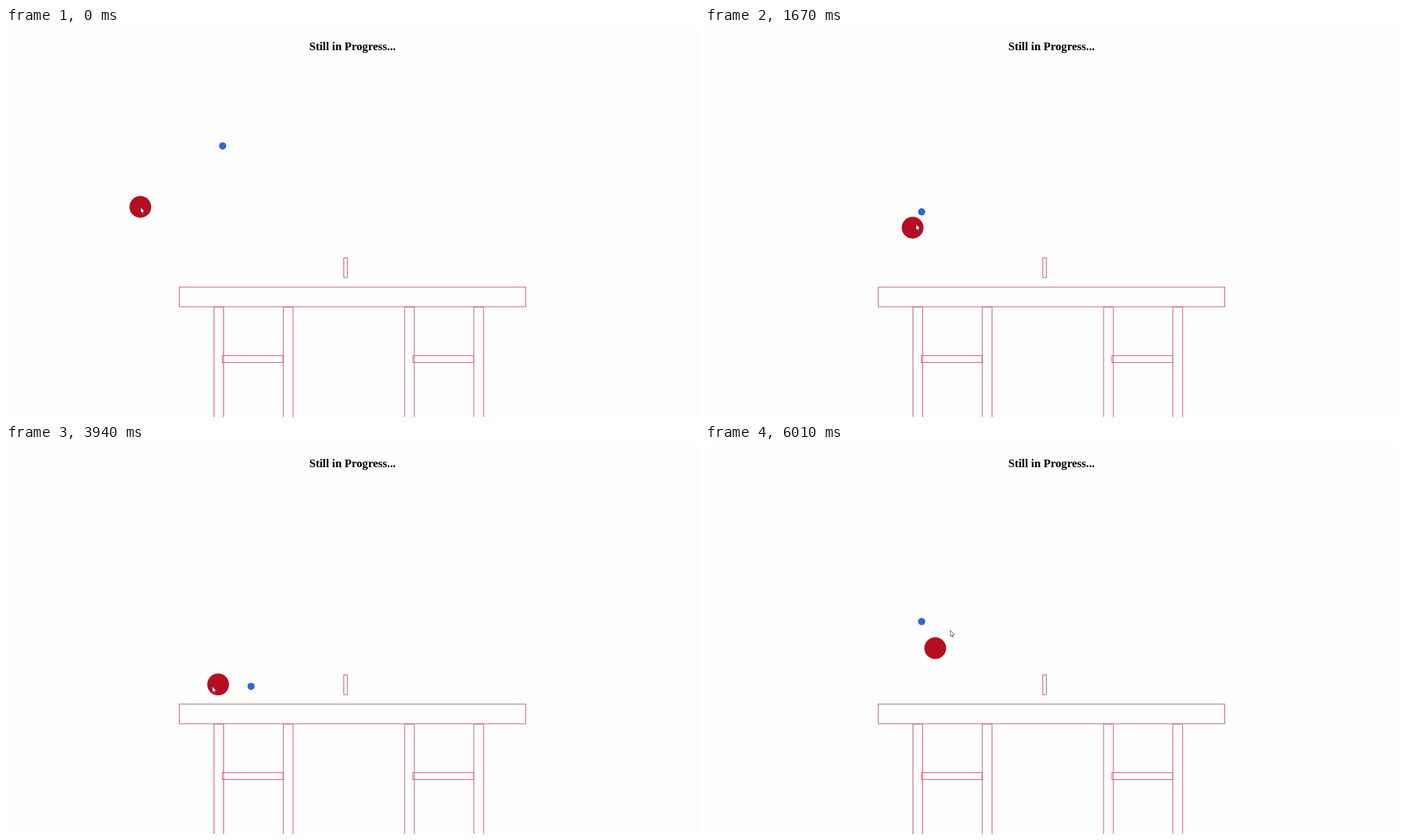
Recreate the animation shown at these times as an HTML page with a canvas. Size 998 px wide and 561 px high, loop 6.05 s.

```html
<!DOCTYPE html>
<html lang="en">
<head>
<meta charset="utf-8">
<title>Table tennis</title>
<style>
  html, body { margin: 0; width: 100%; height: 100%; overflow: hidden; background: #fdfdfc; }
  canvas { position: absolute; left: 0; top: 0; display: block; }
  h1 {
    position: absolute; left: 0; top: 18px; width: 998px; margin: 0;
    font: bold 16.64px/18.4px "Liberation Serif", "Times New Roman", serif;
    text-align: center; color: #000;
  }
</style>
</head>
<body>
<canvas id="stage" width="998" height="561"></canvas>
<h1>Still in Progress...</h1>
<script>
const ctx = document.getElementById('stage').getContext('2d');
const LOOP = 6050, STEP = 33.39, LAST = 180;

// Ball physics, in px and seconds.
const GRAVITY = 600, BOUNCE = 0.81;
const FLOOR = 369, NET_X = 481, NET_TOP = 326;

// The ball is served, or struck by the paddle.
const launches = [
  { at: 0,    x: 312,   y: 170, vx: 0,     vy: 95 },
  { at: 1685, x: 312,   y: 269, vx: 219.5, vy: -75 },
  { at: 3357, x: 322.6, y: 369, vx: 52,    vy: -211 },
  { at: 4450, x: 386,   y: 347, vx: 618,   vy: -440 },
  { at: 5437, x: 312,   y: 156, vx: 0,     vy: 0 }
];

function ballAt(t) {
  let { at, x, y, vx, vy } = launches.findLast(l => l.at <= t);
  const dt = 0.001;
  for (let ms = at; ms < t; ms++) {
    x += vx * dt;
    y += vy * dt + GRAVITY * dt * dt / 2;
    vy += GRAVITY * dt;
    if (y > FLOOR && vy > 0) { y = FLOOR; vy *= -BOUNCE; }
    if (x > NET_X && y > NET_TOP && vx > 0) vx *= -BOUNCE;
  }
  return [x, y];
}

// Paddle turning points: time, position, velocity.
const moves = [
  [0,    [193.5, 258],   [0, 0]],
  [640,  [228, 300],     [90, 60]],
  [1070, [267, 314],     [150, -175]],
  [1670, [299, 288],     [112, -138]],
  [2600, [318, 299.7],   [0, -17]],
  [3350, [301, 352],     [0, 30]],
  [3940, [305.5, 345.3], [-225, 55]],
  [4250, [296, 369],     [150, 0]],
  [4450, [364, 357],     [600, -200]],
  [4840, [383.5, 362.5], [-250, -88]],
  [5850, [320, 299],     [0, -10]],
  [6010, [331.6, 293],   [538, -662]]
];

function paddleAt(t) {
  const i = Math.max(1, moves.findIndex(m => m[0] >= t));
  const [t0, p, v] = moves[i - 1], [t1, q, w] = moves[i];
  const h = (t1 - t0) / 1000, u = (t - t0) / (t1 - t0), r = 1 - u;
  return [0, 1].map(k =>
    p[k] * r * r * (1 + 2 * u) + q[k] * u * u * (3 - 2 * u) +
    h * u * r * (v[k] * r - w[k] * u));
}

// The pointer drags the paddle and runs ahead of it.
function pointerAt(t) {
  const lead = 40, now = paddleAt(t), before = paddleAt(t - 1);
  return now.map((c, k) => c + 0.5 + lead * (c - before[k]));
}

function line(color, ...pts) {
  ctx.strokeStyle = color;
  ctx.beginPath();
  for (let i = 0; i < pts.length; i += 2) ctx.lineTo(pts[i], pts[i + 1]);
  ctx.stroke();
}

function box(color, x0, y0, x1, y1) {
  ctx.strokeStyle = color;
  ctx.strokeRect(x0, y0, x1 - x0, y1 - y0);
}

function disc([x, y], r, color) {
  ctx.fillStyle = color;
  ctx.beginPath();
  ctx.arc(x, y, r, 0, Math.PI * 2);
  ctx.fill();
}

function drawTable() {
  const plum = '#b9607f', rose = '#e0506c';
  ctx.lineWidth = 1;
  for (const left of [299.5, 574]) {
    for (const x of [left, left + 99.8]) {
      line(plum, x, 561, x, 402.5, x + 14, 402.5);
      line(rose, x + 14, 402.5, x + 14, 561);
    }
    box(rose, left + 12, 472.5, left + 99.5, 482.5);
  }
  box(plum, 249.5, 373.7, 748.5, 402);
  box('#c65f78', 486.5, 331.5, 491.5, 360);
}

function drawPointer([x, y]) {
  ctx.beginPath();
  for (const [dx, dy] of [[0, 0], [0, 8.6], [1.9, 6.9], [3.2, 9.8], [4.4, 9.2], [3.2, 6.4], [5.8, 6.2]])
    ctx.lineTo(x + dx, y + dy);
  ctx.closePath();
  ctx.fillStyle = '#fff';
  ctx.strokeStyle = '#2a2a3a';
  ctx.lineWidth = 0.7;
  ctx.fill();
  ctx.stroke();
}

function draw(now) {
  const n = Math.min(LAST, Math.floor((now % LOOP + 8) / STEP));
  const t = Math.round(n * STEP / 10) * 10;
  ctx.fillStyle = '#fdfdfc';
  ctx.fillRect(0, 0, 998, 561);
  drawTable();
  disc(ballAt(t), 5.2, '#3269cc');
  disc(paddleAt(t), 15.7, '#b70d22');
  drawPointer(pointerAt(t));
}

let start;
function tick(now) {
  start ??= now;
  draw(now - start);
  requestAnimationFrame(tick);
}
draw(0);
requestAnimationFrame(tick);
</script>
</body>
</html>
```
